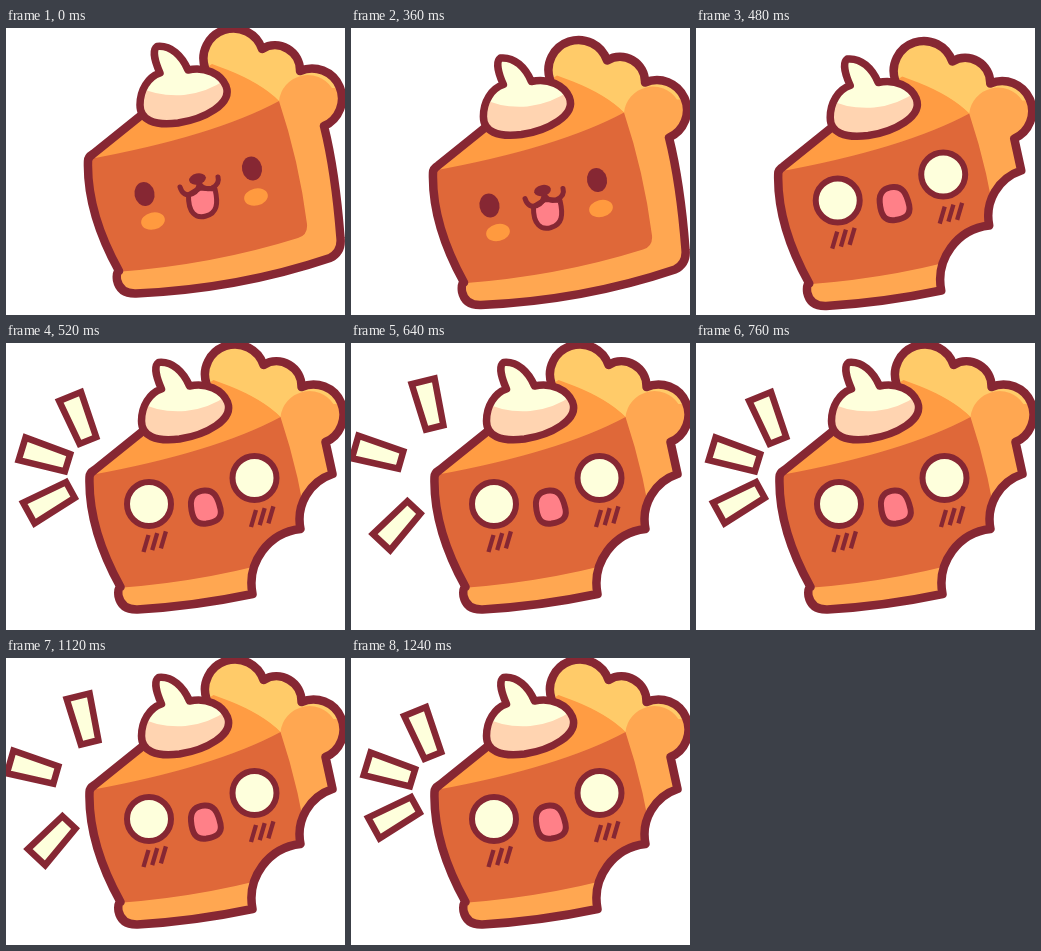
An HTML page with a canvas that plays this animation: 339 px wide and 287 px high, repeating every 1360 ms.

```html
<!DOCTYPE html>
<html lang="en">
<head>
<meta charset="utf-8">
<title>Surprised pie</title>
<style>
html, body { margin: 0; width: 100%; height: 100%; overflow: hidden; background: #fff; }
canvas { display: block; }
</style>
</head>
<body>
<canvas id="stage" width="339" height="287"></canvas>
<script>
const ctx = document.getElementById("stage").getContext("2d");
const LOOP = 1360, BITE = 420, HOP = 100, RAYS = 520, RAY_BEAT = 120;
const INK = "#862733", CREAM = "#feffdc", PINK = "#ff8088", BLUSH = "#ff9a3f";

const crustEdge = "M82 133Q82 129 87 126L138 85L199 40A30 30 0 0 1 256 21" +
  "A25 25 0 0 1 294 43A30 30 0 0 1 318 98";
const leftEdge = "Q114 266 111 252Q110 244 113 243C92 205 81 168 82 133Z";
const path = d => new Path2D(d);
const wholeBody = path(crustEdge + "C326 130 331 165 334.5 210Q336 224 324 230Q232 261 130 265.5" + leftEdge);
const bittenBody = path(crustEdge + "L325 130A48 48 0 0 0 293 185A55 55 0 0 0 245 250Q188 262 130 265.5" + leftEdge);
const crustTop = path("M195 45V-5H340V60H326A29 29 0 0 0 273 73Q255 55 215 40Z");
const surface = path("M80 130L136 80L206 36L222 42Q255 55 273 73Q206 109 80 132Z");
const front = path("M78 132Q206 109 273 73Q293 133 301 196Q302 207 292 210Q206 237 110 244H78Z");
const cream = path("M154 45C149 34 146 22 151 18.5C165 17 176 28 182 42C199 38 215 46 220 58" +
  "C227 76 198 91 172 95C148 98 134 92 134 77C134 62 142 49 154 45Z");
const creamShade = path("M128 55Q146 69 178 67Q206 64 228 45V102H128Z");
const smile = path("M174 159Q177 169 186 166Q193 163 193 155Q198 163 206 160Q214 156 212 149");
const openMouth = path("M182.5 167C182 185 190 191 200 188C211 185 212.5 176 209 161L194 160Z");
const gasp = path("M183.5 162C182.5 151 189 147 197 146.5C206 146 210 152 213 165C215 175 208 178 199 179.5C188 181 184.5 174 183.5 162Z");
const ray = path("M-35 -9L-82.5 -11.8V11.8L-35 9Z");

function fill(shape, color) {
  ctx.fillStyle = color;
  ctx.fill(shape);
}

function stroke(shape, width) {
  ctx.lineWidth = width;
  ctx.stroke(shape);
}

function ellipse(x, y, rx, ry, tilt = 0) {
  const shape = new Path2D();
  shape.ellipse(x, y, rx, ry, tilt, 0, 2 * Math.PI);
  return shape;
}

function clipped(shape, draw) {
  ctx.save();
  ctx.clip(shape);
  draw();
  ctx.restore();
}

function drawBody(shape) {
  clipped(shape, () => {
    fill(shape, "#ffa751");
    fill(crustTop, "#ffcb69");
    fill(surface, "#ff9c43");
    fill(front, "#df6839");
  });
  stroke(shape, 8.5);
}

function drawCream() {
  fill(cream, CREAM);
  clipped(cream, () => fill(creamShade, "#ffd4b1"));
  stroke(cream, 7.5);
}

function drawHappyFace() {
  for (const [x, y] of [[138.5, 166], [246, 140.5]]) fill(ellipse(x, y, 10, 12, -0.2), INK);
  for (const [x, y] of [[147, 193], [250, 169]]) fill(ellipse(x, y, 12, 8.5, -0.23), BLUSH);
  fill(openMouth, PINK);
  stroke(openMouth, 5);
  stroke(smile, 5);
  fill(ellipse(191.5, 151, 8.5, 5.5, -0.2), INK);
}

function drawShockedFace() {
  for (const [x, y] of [[141.5, 160], [247, 134]]) {
    const eye = ellipse(x, y, 22, 22);
    fill(eye, CREAM);
    stroke(eye, 6);
  }
  fill(gasp, PINK);
  stroke(gasp, 6);
  ctx.lineCap = "butt";
  for (const [x, y] of [[141, 191], [248.5, 166]])
    for (let i = 0; i < 3; i++) stroke(path(`M${x + 8.7 * i} ${y - 1.8 * i}l-5 17`), 4.3);
  ctx.lineCap = "round";
}

function drawRays(spread) {
  const angles = spread ? [76, 16, -47] : [68, 17, -29];
  ctx.lineJoin = "miter";
  for (const angle of angles) {
    ctx.save();
    ctx.translate(95, 130);
    ctx.rotate(angle * Math.PI / 180);
    ctx.translate(spread ? -12 : 0, 0);
    fill(ray, CREAM);
    stroke(ray, 6.5);
    ctx.restore();
  }
  ctx.lineJoin = "round";
}

function draw(time) {
  const t = Math.floor(time % LOOP / 40) * 40;
  const bitten = t >= BITE;
  const dip = Math.max(0, 1 - ((t - BITE) / HOP) ** 2);

  ctx.fillStyle = "#fff";
  ctx.fillRect(0, 0, 339, 287);
  ctx.strokeStyle = INK;
  ctx.lineJoin = ctx.lineCap = "round";

  ctx.save();
  ctx.translate(bitten ? 1.5 - 2 * dip : 0, 18 * dip + (bitten ? 1 : 0));
  drawBody(bitten ? bittenBody : wholeBody);
  if (bitten) drawShockedFace(); else drawHappyFace();
  if (!bitten) ctx.translate(-2.5 * dip, 0);
  drawCream();
  ctx.restore();

  if (t >= RAYS) drawRays(Math.floor((t - RAYS) / RAY_BEAT) % 2 === 1);
}

const start = performance.now();
function tick() {
  draw(performance.now() - start);
  requestAnimationFrame(tick);
}
tick();
</script>
</body>
</html>
```
